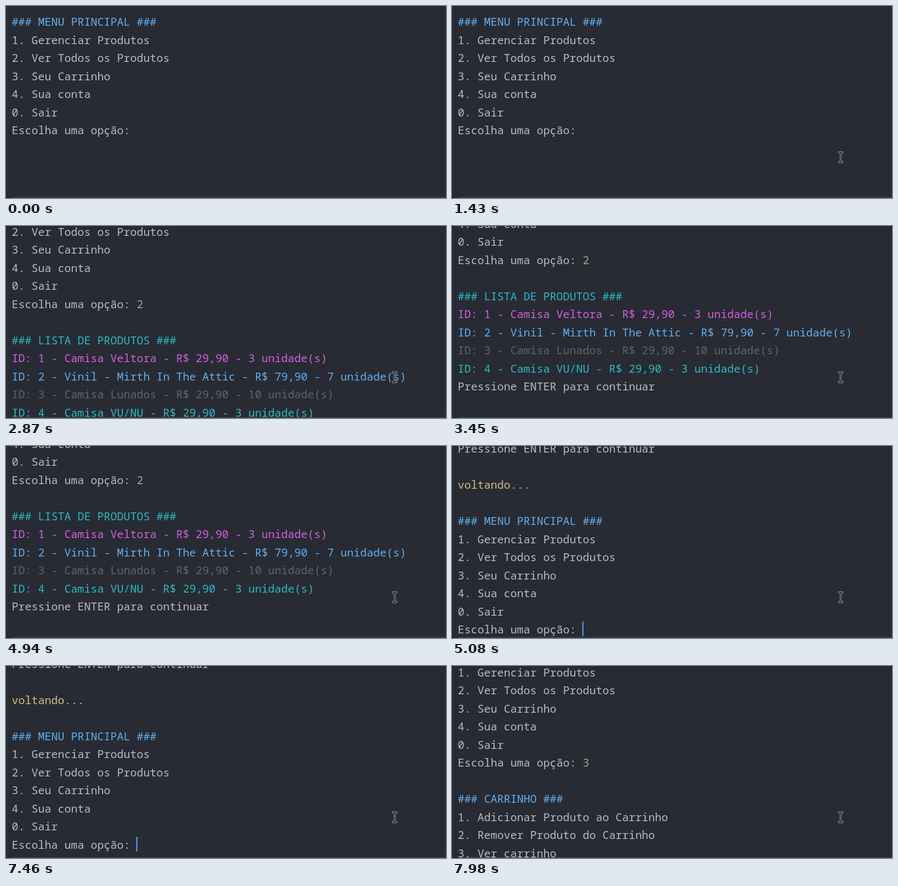
Write an HTML page that moves like this. It is 669x292 px and loops after 8 s.

```html
<!DOCTYPE html>
<html lang="pt-BR">
<head>
<meta charset="utf-8">
<title>Menu no terminal</title>
<style>
  html, body { margin: 0; width: 100%; height: 100%; overflow: hidden; background: #282b33; }
  svg { display: block; width: 100%; height: 100%; }
  text { font: 500 16.667px "Noto Sans Mono", "DejaVu Sans Mono", monospace; }
</style>
</head>
<body>
<svg viewBox="0 0 669 292">
  <rect width="669" height="292" fill="#282b33"/>
  <g id="lines"></g>
  <rect id="caret" height="22" fill="#4d8df0"/>
  <rect x="10" y="291" width="659" height="1" fill="#4b4e55"/>
  <path id="mouse" d="M-3.5-8.5h7v2.5h-2.5v12h2.5v2.5h-7v-2.5h2.5v-12h-2.5z" fill="#2b2e36" stroke="#7d8085"/>
</svg>
<script>
const LOOP = 8000, PITCH = 27.5, CELL = 10, LEFT = 8.8;
const BOTTOM_ROW = 9, GLIDE = 140, FRAME = 70, BLINK = 500;
const PLAIN = '#b9bcc1', BLUE = '#61afef', CYAN = '#2bbac5', PINK = '#d55fde',
      GRAY = '#5f646d', GOLD = '#d3bd7e', INPUT = '#98ad82';

// Each reply appears at a time, with the glide to its last row already under way
const list = { time: 2870, lead: 71, last: 14 };
const menu = { time: 5010, lead: 55, last: 23 };
const cart = { time: 7980, lead: 76, last: 31 };

// The caret stays lit after each move, then blinks from rest
const moves = [
  { time: 490, row: 6, col: 19, rest: 1430 },
  { time: 2310, row: 6, col: 20 },
  { time: 2690, row: 7, col: 0 },
  { time: list.time, row: list.last, col: 0, rest: 3445 },
  { time: menu.time, row: menu.last, col: 19, rest: 5960 },
  { time: 7710, row: menu.last, col: 20 },
  { time: cart.time, row: cart.last, col: 19 }
];

const byId = id => document.getElementById(id);
const set = (el, attrs) => {
  for (const key in attrs) el.setAttribute(key, attrs[key]);
};
const show = (el, on) => set(el, { visibility: on ? 'visible' : 'hidden' });
const clamp = x => Math.min(1, Math.max(0, x));
const smooth = x => x * x * (3 - 2 * x);
const mix = (a, b, p) => a + (b - a) * p;

const rows = [];
function addRow(row, text, fill = PLAIN, from = 0, col = 0) {
  const el = document.createElementNS('http://www.w3.org/2000/svg', 'text');
  el.textContent = text;
  set(el, { x: LEFT + col * CELL, fill });
  byId('lines').append(el);
  rows.push({ el, row, from });
}
function addBlock(row, from, lines) {
  lines.forEach(([text, fill], i) => addRow(row + i, text, fill, from));
}
function addMenu(row, from, typed, typedAt) {
  addBlock(row, from, [
    ['### MENU PRINCIPAL ###', BLUE], ['1. Gerenciar Produtos'],
    ['2. Ver Todos os Produtos'], ['3. Seu Carrinho'], ['4. Sua conta'],
    ['0. Sair'], ['Escolha uma opção:']
  ]);
  addRow(row + 6, typed, INPUT, typedAt, 19);
}

addMenu(0, 0, '2', 2310);
addBlock(8, list.time, [
  ['### LISTA DE PRODUTOS ###', CYAN],
  ['ID: 1 - Camisa Veltora - R$ 29,90 - 3 unidade(s)', PINK],
  ['ID: 2 - Vinil - Mirth In The Attic - R$ 79,90 - 7 unidade(s)', BLUE],
  ['ID: 3 - Camisa Lunados - R$ 29,90 - 10 unidade(s)', GRAY],
  ['ID: 4 - Camisa VU/NU - R$ 29,90 - 3 unidade(s)', CYAN],
  ['Pressione ENTER para continuar']
]);
addRow(15, 'voltando...', GOLD, menu.time);
addMenu(17, menu.time, '3', 7710);
addBlock(25, cart.time, [
  ['### CARRINHO ###', BLUE], ['1. Adicionar Produto ao Carrinho'],
  ['2. Remover Produto do Carrinho'], ['3. Ver carrinho']
]);

function scrollAt(t) {
  let y = 0;
  for (const { time, lead, last } of [list, menu, cart]) {
    if (t < time) break;
    const run = Math.floor((t - time) / FRAME) * FRAME + lead;
    y = mix(y, (last - BOTTOM_ROW) * PITCH, smooth(clamp(run / GLIDE)));
  }
  return y;
}

function drawCaret(t, middle) {
  const move = moves.filter(m => m.time <= t).pop();
  show(byId('caret'), move);
  if (!move) return;
  const { row, col, rest = LOOP } = move;
  show(byId('caret'), t < rest || Math.floor((t - rest) / BLINK) % 2 === 1);
  set(byId('caret'), { x: Math.max(10, 8 + col * CELL), y: middle(row) - 12,
                       width: col ? 2 : 1 });
}

function drawMouse(t) {
  const p = smooth(clamp(Math.floor((t - 190) / 75) / 4));
  show(byId('mouse'), t >= 190);
  set(byId('mouse'), {
    transform: `translate(${Math.round(mix(611, 591, p))} ${Math.round(mix(283, 230, p))})`
  });
}

function draw(t) {
  const scroll = scrollAt(t);
  const middle = row => Math.round(24 + row * PITCH - scroll);
  for (const { el, row, from } of rows) {
    set(el, { y: middle(row) + 6 });
    show(el, t >= from);
  }
  drawCaret(t, middle);
  drawMouse(t);
}

const start = performance.now();
function tick() {
  draw((performance.now() - start) % LOOP);
  requestAnimationFrame(tick);
}
tick();
</script>
</body>
</html>
```
